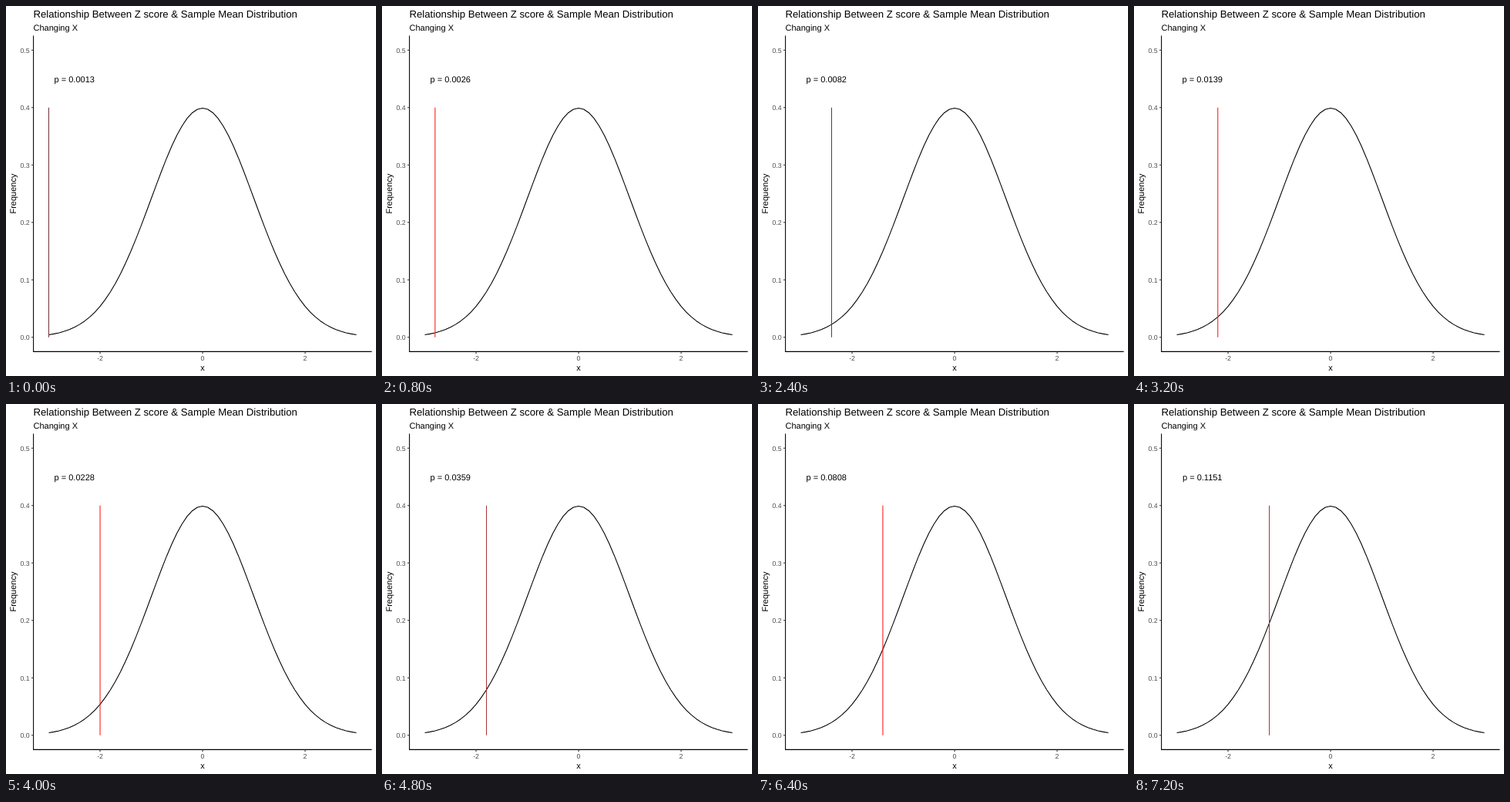
An HTML page that plays this animation: 480 px wide and 480 px high, repeating every 8 s.

```html
<!DOCTYPE html>
<html lang="en">
<head>
<meta charset="utf-8">
<title>Z score and p value</title>
<style>
  html, body { margin: 0; width: 100%; height: 100%; overflow: hidden; background: #fff; }
  svg { display: block; width: 480px; height: 480px; }
  text { font: 11px "Liberation Sans", Arial, sans-serif; text-rendering: geometricPrecision; }
  .title { font-size: 13.2px; }
  .tick { font-size: 8.8px; fill: #4d4d4d; }
  .mid { text-anchor: middle; }
  .end { text-anchor: end; }
  path { fill: none; stroke: #000; stroke-width: 1.07; }
  #ticks { stroke: #333; }
</style>
</head>
<body>
<svg id="plot" viewBox="0 0 480 480">
  <text class="title" x="35.5" y="15">Relationship Between Z score &amp; Sample Mean Distribution</text>
  <text x="35.5" y="32">Changing X</text>
  <path id="curve" stroke-linejoin="round"/>
  <path id="marker"/>
  <text id="label" class="mid" x="88.75" y="98.9"></text>
  <path d="M35.6 38.5V448.4H474.5"/>
  <path id="ticks"/>
  <text class="mid" x="255" y="473">x</text>
  <text class="mid" transform="translate(13.2 243.6) rotate(-90)">Frequency</text>
</svg>
<script>
const STEP = 800, COUNT = 10;
const RED = '#ff1a1a', BROWN = '#a83238', MAROON = '#70303c';
const $ = id => document.getElementById(id);
const px = z => 255.04 + 66.5 * z;
const py = d => 429.8 - 745 * d;
const density = z => Math.exp(-z * z / 2) / Math.sqrt(2 * Math.PI);

// Lower tail of the normal distribution, by its power series
function tail(z) {
  let term = z, sum = z;
  for (let k = 1; k < 60; k++) {
    term *= z * z / (2 * k + 1);
    sum += term;
  }
  return 0.5 + density(z) * sum;
}

function addText(x, y, cls, content) {
  const el = document.createElementNS('http://www.w3.org/2000/svg', 'text');
  el.setAttribute('x', x);
  el.setAttribute('y', y);
  el.setAttribute('class', cls);
  el.textContent = content;
  $('plot').append(el);
}

const points = Array.from({ length: 61 }, (_, i) => {
  const z = (i - 30) / 10;
  return px(z).toFixed(2) + ' ' + py(density(z)).toFixed(2);
});
$('curve').setAttribute('d', 'M' + points.join('L'));

let ticks = '';
for (let i = 0; i <= 5; i++) {
  const y = py(i / 10);
  ticks += `M32.9 ${y}H35.6`;
  addText(30.7, y + 3.2, 'tick end', (i / 10).toFixed(1));
}
for (const z of [-2, 0, 2]) {
  ticks += `M${px(z)} 448.4v2.75`;
  addText(px(z), 459.6, 'tick mid', z);
}
$('ticks').setAttribute('d', ticks);

function lineColor(i) {
  if (i % 3 || i > 9) return RED;
  return i < 6 ? MAROON : BROWN;
}

let shown = -1;
function draw(now) {
  const i = Math.floor(now / STEP) % COUNT;
  if (i !== shown) {
    shown = i;
    const z = -3 + i / 5;
    const color = lineColor(i);
    // Dark lines sit on one whole pixel column
    const x = color === RED ? px(z) : Math.floor(px(z)) + 0.5;
    const marker = $('marker');
    marker.setAttribute('d', `M${x} ${py(0)}V${py(0.4)}`);
    marker.style.stroke = color;
    marker.style.strokeWidth = color === RED ? 1.07 : 1;
    $('label').textContent = 'p = ' + tail(z).toFixed(4);
  }
}

const start = performance.now();
function loop() {
  draw(performance.now() - start);
  requestAnimationFrame(loop);
}
loop();
</script>
</body>
</html>
```
